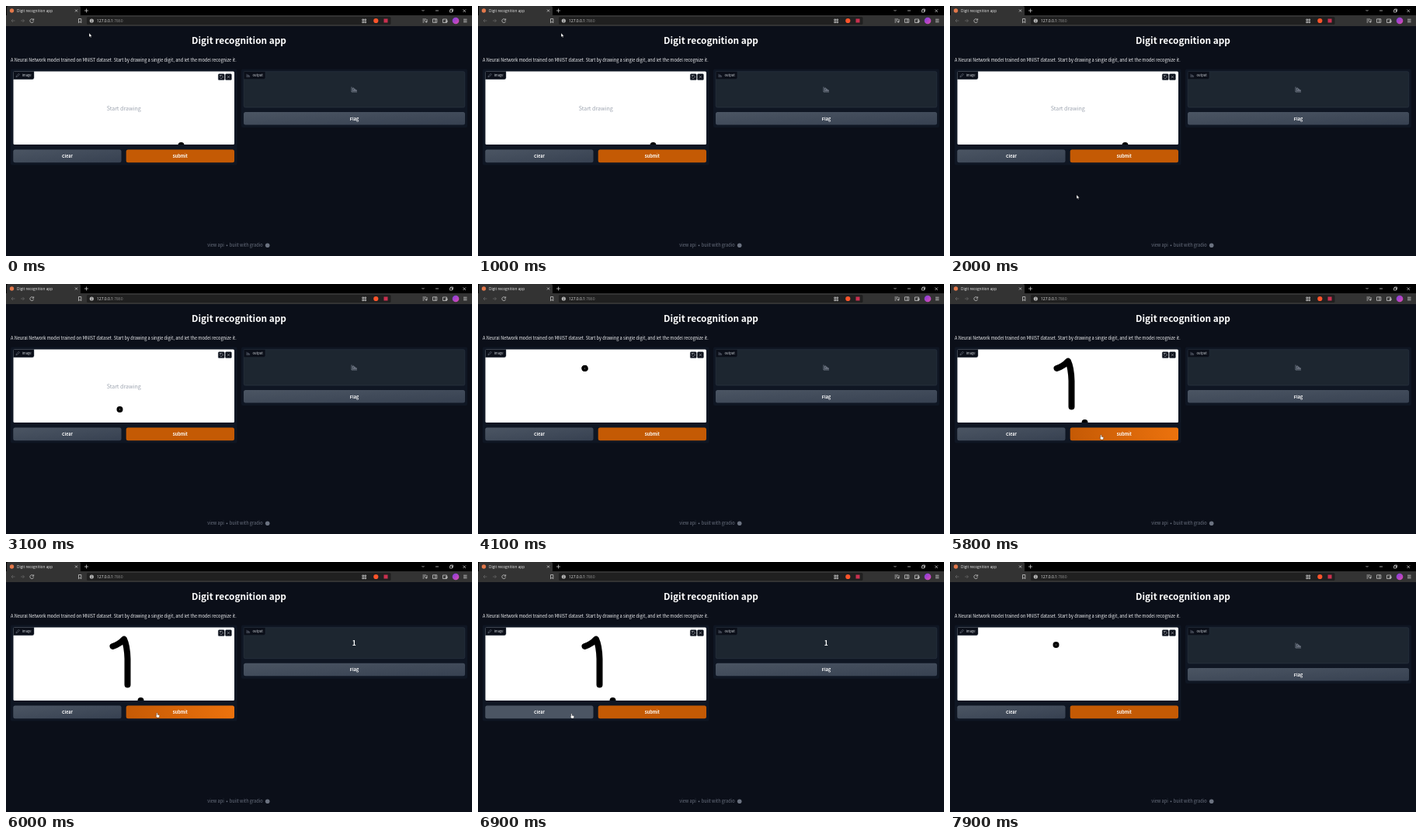
Write an HTML page that moves like this. It is 600 px wide and 323 px high and loops after 8 s.

```html
<!DOCTYPE html>
<html lang="en">
<head>
<meta charset="utf-8">
<title>Digit recognition app</title>
<style>
html, body { margin: 0; width: 100%; height: 100%; overflow: hidden; background: #0b0f19; }
svg { display: block; width: 600px; height: 323px; }
text { font: 5.58px "Noto Sans CJK JP", "Noto Sans CJK SC", "Noto Sans CJK", "Noto Sans", sans-serif; fill: #f3f4f6; }
.bold { font-weight: 700; font-size: 5.4px; fill: #fff; }
.mid { text-anchor: middle; }
.ui { font: 4.75px "Open Sans", "Noto Sans", sans-serif; fill: #e4e4e4; }
.tag { font-size: 4.2px; fill: #d1d5db; }
.foot { fill: #6b7280; }
.line { fill: none; stroke: #dcdcdc; stroke-width: .7; }
.dim { stroke: #6a6a6a; }
.panel { fill: #0f1623; }
.tab { fill: #0b0f19; stroke: #2c3645; stroke-width: .4; }
.icon { fill: none; stroke: #8b93a1; stroke-width: .5; }
</style>
</head>
<body>
<svg viewBox="0 0 600 323">
  <defs>
    <linearGradient id="gray" x2="1" y2="1"><stop stop-color="#4b5563"/><stop offset="1" stop-color="#374151"/></linearGradient>
    <linearGradient id="hot" x2="1"><stop stop-color="#c55a05"/><stop offset="1" stop-color="#ec720d"/></linearGradient>
    <linearGradient id="face" x2="1" y2="1"><stop stop-color="#7c3fe0"/><stop offset="1" stop-color="#e04bb0"/></linearGradient>
    <clipPath id="sheet"><rect x="9.5" y="84.5" width="284.5" height="94.5" rx="1.5"/></clipPath>
    <path id="bars" d="M0 0V6.5H7M1.5 1.5H3V5.2H1.5ZM3.4 3H4.7V5.2H3.4ZM5.2 4.2H6.4V5.2H5.2Z"/>
  </defs>

  <!-- browser -->
  <rect width="600" height="12.5"/>
  <path d="M1 12.5V2Q1 0 3 0H94Q96 0 96 2V12.5Z" fill="#333"/>
  <rect y="12" width="600" height="14" fill="#333"/>
  <rect x="104" y="14" width="391.500" height="10" rx="1.500" fill="#202020"/>
  <circle cx="7.500" cy="6" r="2.700" fill="#e2784a"/>
  <text class="ui" x="14" y="7.700">Digit recognition app</text>
  <path class="line" d="M89 4.500L92 7.500M92 4.500L89 7.500M101 6H106M103.500 3.500V8.500M535.500 5L537 6.500L538.500 5M553 6H557M571.500 5H574.500V8H571.500ZM572.500 5V4H575.500V7H574.500M588.500 4.500L592 8M592 4.500L588.500 8"/>
  <path class="line dim" d="M11.500 19H7M9 17L7 19L9 21M19 19H23.500M21.500 17L23.500 19L21.500 21"/>
  <path class="line" d="M35.200 17.700A2.400 2.400 0 1 0 35.600 19.700M35.700 16.300V18.200H33.700"/>
  <path class="line" d="M93.500 16.500H96.800V21.700L95.150 20.300L93.500 21.700Z"/>
  <circle cx="110.300" cy="19" r="2.600" fill="#b5b5b5"/>
  <path d="M110.300 17.400V18M110.300 18.700V20.600" stroke="#202020" stroke-width=".7"/>
  <text class="ui" x="117" y="20.800" style="font-size:4.950px">127.0.0.1<tspan fill="#8a8a8a">:7860</tspan></text>
  <path class="line" d="M458.800 17H460.500V18.700H458.800ZM461.800 17H463.500V18.700H461.800ZM458.800 20H460.500V21.700H458.800ZM461.800 20H463.500V21.700H461.800Z"/>
  <circle cx="476.300" cy="19" r="3.100" fill="#fb542b"/>
  <rect x="486.500" y="16.500" width="5" height="5" fill="#c9304f"/>
  <path class="line" d="M536.500 17H541M536.500 19H540M536.500 21H538.500M542 17V21H540.500V20H542M549.500 16.800H554.800V21.300H549.500ZM552.800 16.800V21.300M562.500 17H567.500V21.500H562.500ZM565.500 19H568.200V20.300H565.500M589 17.200H593.500M589 19H593.500M589 20.800H593.500"/>
  <circle cx="579" cy="19" r="4.300" fill="url(#face)"/>

  <!-- page -->
  <text class="bold mid" x="300" y="48.700" style="font-size:11.800px">Digit recognition app</text>
  <text x="6" y="71.800">A Neural Network model trained on MNIST dataset. Start by drawing a single digit, and let the model recognize it.</text>

  <rect class="panel" x="6" y="81.500" width="291.500" height="124" rx="2"/>
  <rect x="9.500" y="84.500" width="284.500" height="94.500" rx="1.500" fill="#fff"/>
  <text id="hint" class="mid" x="151.700" y="134.600" style="font-size:7px;fill:#9ca3af">Start drawing</text>
  <g clip-path="url(#sheet)">
    <path id="stroke" pathLength="1" d="M137.500 109Q146.500 106 152 99.700Q156 108 156.500 125V158.500" fill="none" stroke="#000" stroke-width="8" stroke-linecap="round" stroke-linejoin="round"/>
    <g id="brush"><circle r="4"/><circle id="dot" r=".6" fill="#b0b0b0"/></g>
  </g>
  <path class="tab" d="M9.500 84.500H36V92.500Q36 94.700 33.800 94.700H9.500Z"/>
  <path class="icon" d="M13 91.800L13.500 90.200L16.300 87.400L17.400 88.500L14.600 91.300Z"/>
  <text class="tag" x="20.700" y="91.200">image</text>
  <rect class="tab" x="273.300" y="87.700" width="7.900" height="7.900" rx="1.200"/>
  <rect class="tab" x="282.500" y="87.700" width="7.900" height="7.900" rx="1.200"/>
  <path class="icon" style="stroke:#d1d5db" d="M275.600 90.300A2 2 0 1 1 275.300 92.200M275.500 89V90.500H277M284.700 89.900L288.200 93.400M288.200 89.900L284.700 93.400"/>

  <rect id="clear" x="9.300" y="185.500" width="139.200" height="16.700" rx="2.500"/>
  <text class="bold mid" x="79" y="196">Clear</text>
  <rect id="submit" x="154.700" y="185.500" width="139.300" height="16.700" rx="2.500"/>
  <text class="bold mid" x="224.200" y="196">Submit</text>

  <rect id="side" class="panel" x="303" y="81.500" width="291" height="75.500" rx="2"/>
  <rect id="box" x="306.200" y="84.700" width="284.600" height="46.300" rx="2" fill="#1d2630" stroke="#303b49" stroke-width=".5"/>
  <path class="tab" d="M306.200 84.500H334V92.500Q334 94.700 331.800 94.700H306.200Z"/>
  <use href="#bars" class="icon" transform="translate(309.700 87.700) scale(.63)"/>
  <text class="tag" x="317.500" y="91.200">output</text>
  <use id="empty" href="#bars" class="icon" style="stroke-width:.7" x="445" y="104.500"/>
  <text id="answer" class="bold mid" x="448.300" y="108" style="font-size:8.400px">1</text>
  <g id="flag">
    <rect x="306" y="137" width="285" height="16.500" rx="2.500" fill="url(#gray)"/>
    <text class="bold mid" x="448.500" y="147.500">Flag</text>
  </g>

  <text class="foot" x="259.300" y="311">view api</text>
  <circle cx="284.500" cy="309.300" r=".9" fill="#6b7280"/>
  <text class="foot" x="287.800" y="311">built with gradio</text>
  <circle cx="336.700" cy="309.200" r="2.800" fill="#6b7280"/>

  <path id="arrow" d="M0 0V5L1.200 4L2 5.800L2.900 5.400L2.100 3.700H3.700Z" fill="#fff" stroke="#000" stroke-width=".3"/>
  <path id="hand" d="M-.7 .3Q0-.6 .6 .3V2.200L2.800 2.800Q3.300 3 3.200 3.700L2.700 6H-.2L-1.800 3.500Q-1.700 2.800-.7 3.500Z" fill="#fff" stroke="#000" stroke-width=".3"/>
</svg>
<script>
const $ = id => document.getElementById(id);
const show = (id, on) => $(id).style.display = on ? "" : "none";
const place = (id, x, y) => $(id).setAttribute("transform", `translate(${x} ${y})`);
const ease = k => k * k * (3 - 2 * k);

const LOOP = 8000, STEP = 100;
const PRESS = 4000, DRAW = 4200, LIFT = 5000, RESULT = 5900, RESET = 7100, PRESS2 = 7800;

// pointer stops: time, x, y
const stops = [
  [0, 107, 35], [1000, 107, 35], [1800, 163, 244], [2000, 163, 244], [2200, 164, 248],
  [2700, 152, 195], [3000, 147, 165], [3700, 137.5, 109], [DRAW, 137.5, 109],
  [LIFT, 156.5, 158.5], [5200, 173.5, 179], [5500, 194.5, 195], [6300, 194.5, 195],
  [6800, 120.5, 196], [7200, 120.5, 196], [7700, 136.5, 107], [LOOP, 136.5, 107]
];

const stroke = $("stroke"), length = stroke.getTotalLength();

function pointer(t) {
  if (t >= DRAW && t < LIFT) {
    const p = stroke.getPointAtLength(length * (t - DRAW) / (LIFT - DRAW));
    return [p.x, p.y];
  }
  const i = stops.findIndex(s => s[0] > t);
  const [t0, x0, y0] = stops[i - 1], [t1, x1, y1] = stops[i];
  const k = ease((t - t0) / (t1 - t0));
  return [x0 + (x1 - x0) * k, y0 + (y1 - y0) * k];
}

function render(t) {
  const [x, y] = pointer(t);
  const onSheet = x > 9.5 && x < 294 && y > 84.5 && y < 179;
  const onRow = y > 185.5 && y < 202.2;
  const onClear = onRow && x > 9.3 && x < 148.5;
  const onSubmit = onRow && x > 154.7 && x < 294;

  place("brush", ...(onSheet ? [x, y] : t < PRESS ? [225.5, 180] : [173.5, 179]));
  show("dot", onSheet);
  show("hint", t < PRESS || t >= RESET && t < PRESS2);
  show("stroke", t >= PRESS && t < RESET);
  const drawn = Math.min(1, Math.max(.001, (t - DRAW) / (LIFT - DRAW)));
  stroke.setAttribute("stroke-dasharray", drawn + " 2");

  $("clear").setAttribute("fill", onClear ? "#4b5563" : "url(#gray)");
  $("submit").setAttribute("fill", onSubmit ? "url(#hot)" : "#c45a04");

  const done = t >= RESULT && t < RESET, lift = done ? 6.3 : 0;
  $("side").setAttribute("height", 75.5 - lift);
  $("box").setAttribute("height", 46.3 - lift);
  place("flag", 0, -lift);
  show("empty", !done);
  show("answer", done);

  const overButton = onClear || onSubmit;
  show("arrow", !onSheet && !overButton);
  show("hand", overButton);
  place("arrow", x, y);
  place("hand", x, y);
}

function tick() {
  const t = performance.now() % LOOP;
  render(Math.floor(t / STEP) * STEP);
  requestAnimationFrame(tick);
}
tick();
</script>
</body>
</html>
```
